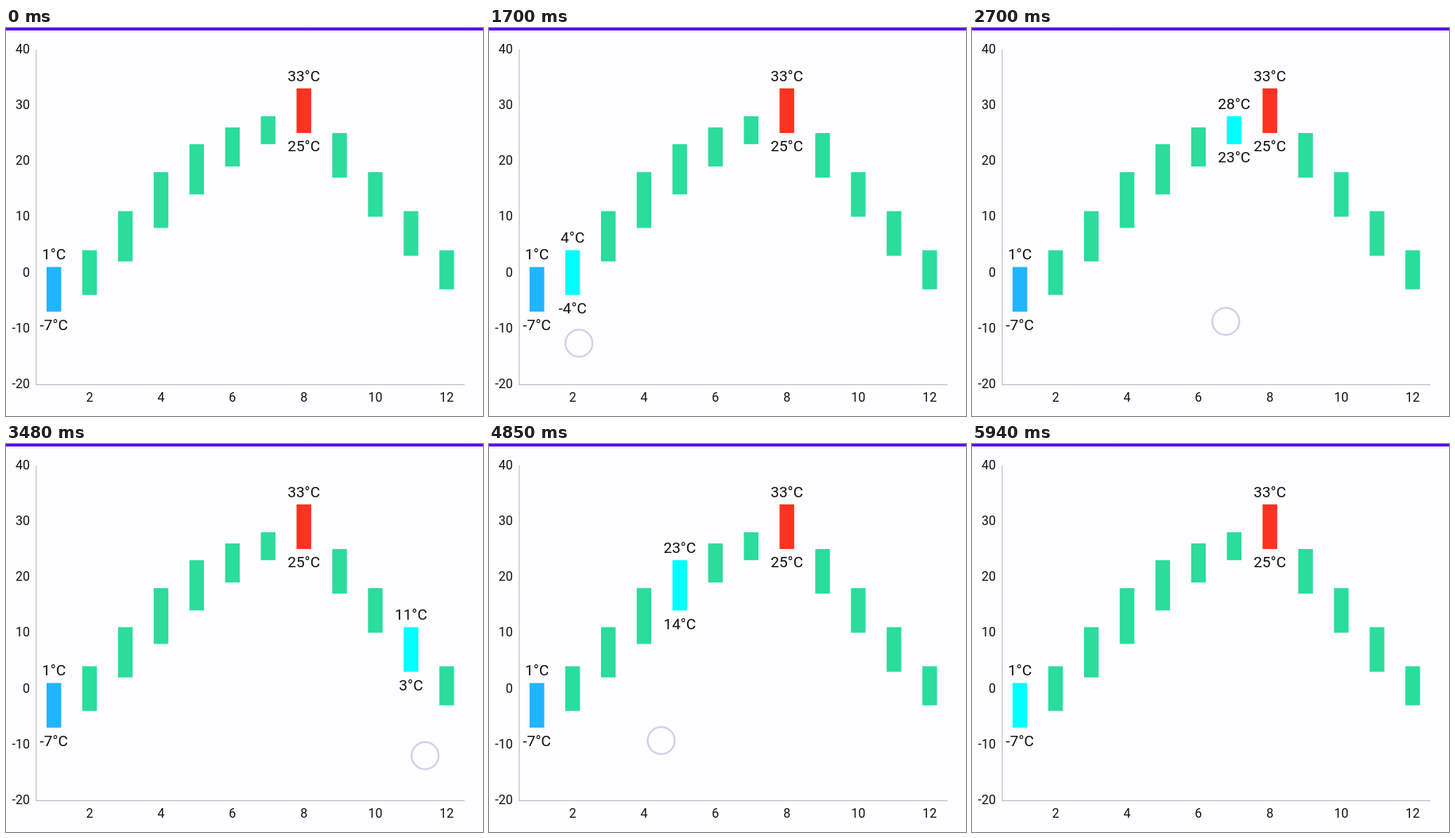
Recreate the animation shown at these times as an HTML page with a canvas. Size 600 by 488 pixels, loop 5970 ms.

```html
<!DOCTYPE html>
<html lang="en">
<head>
<meta charset="utf-8">
<title>Monthly temperature range</title>
<style>
html, body { margin: 0; width: 100%; height: 100%; overflow: hidden; background: #fefdff; }
canvas { display: block; }
</style>
</head>
<body>
<canvas id="chart" width="600" height="488"></canvas>
<script>
const ctx = document.getElementById('chart').getContext('2d');
const LOOP = 5970, TOUCH_START = 1210, TOUCH_END = 5940, LAG = 30;
const LEFT = 37.8, RIGHT = 576.8, TOP = 26.8, BOTTOM = 448;
const SLOT = (RIGHT - LEFT) / 12, BAR = 18.4;
const FONT = 'Roboto, sans-serif';
const C = {
  bg: '#fefdff', header: '#5a00e6', axis: '#bfbfc2', text: '#111',
  bar: '#2bdc9c', cold: '#1fb5ff', hot: '#fc3320', active: '#00ffff'
};

// Monthly highs, and how far each low lies below
const highs = [1, 4, 11, 18, 23, 26, 28, 33, 25, 18, 11, 4];
const spans = [8, 8, 9, 10, 9, 7, 5, 8, 8, 8, 8, 7];
const coldest = highs.indexOf(Math.min(...highs));
const hottest = highs.indexOf(Math.max(...highs));

// Key points of the finger's sweep: [ms, x, y]
const path = [
  [1210, 58, 407], [1700, 113, 396.5], [2700, 319, 369], [3480, 527, 392],
  [3850, 575, 402], [4360, 445, 375.5], [4850, 217, 373], [5420, 35, 433],
  [5900, 25, 419]
];

const rise = (i, k) => (path[i + 1][k] - path[i][k]) / (path[i + 1][0] - path[i][0]);

// Monotone tangent: harmonic mean of the neighbouring slopes
function slope(i, k) {
  if (i === 0 || i === path.length - 1) return 0;
  const a = rise(i - 1, k), b = rise(i, k);
  return a * b > 0 ? 2 * a * b / (a + b) : 0;
}

function along(t, k) {
  const last = path.length - 1;
  if (t >= path[last][0]) return path[last][k];
  let i = 0;
  while (t >= path[i + 1][0]) i++;
  const h = path[i + 1][0] - path[i][0], u = (t - path[i][0]) / h, v = 1 - u;
  return v * v * (1 + 2 * u) * path[i][k] + u * u * (3 - 2 * u) * path[i + 1][k]
    + h * u * v * (v * slope(i, k) - u * slope(i + 1, k));
}

const yOf = deg => BOTTOM - (deg + 20) * (BOTTOM - TOP) / 60;
const xOf = i => LEFT + (i + 0.5) * SLOT;

function label(str, x, y, size, align) {
  ctx.font = size + 'px ' + FONT;
  ctx.textAlign = align;
  ctx.fillStyle = C.text;
  ctx.fillText(str, x, y);
}

function drawFrame() {
  ctx.fillStyle = C.bg;
  ctx.fillRect(0, 0, 600, 488);
  ctx.fillStyle = C.header;
  ctx.fillRect(0, 0, 600, 3);
  const shade = ctx.createLinearGradient(0, 3, 0, 6);
  shade.addColorStop(0, 'rgba(150,140,190,0.35)');
  shade.addColorStop(1, 'rgba(150,140,190,0)');
  ctx.fillStyle = shade;
  ctx.fillRect(0, 3, 600, 3);

  ctx.fillStyle = C.axis;
  ctx.fillRect(LEFT - 0.4, TOP, 1.2, BOTTOM - TOP);
  ctx.fillRect(LEFT - 0.4, BOTTOM, RIGHT - LEFT + 0.4, 1.2);
  for (let d = -20; d <= 40; d += 10) label(d, 30, yOf(d) + 5, 16, 'right');
  for (let m = 2; m <= 12; m += 2) label(m, xOf(m - 1), 469.6, 16, 'center');
}

function drawBars(active) {
  highs.forEach((high, i) => {
    const low = high - spans[i];
    const x = xOf(i), top = yOf(high), bottom = yOf(low);
    const base = i === coldest ? C.cold : i === hottest ? C.hot : C.bar;
    ctx.fillStyle = i === active ? C.active : base;
    ctx.fillRect(x - BAR / 2, top, BAR, bottom - top);
    if (i === active || base !== C.bar) {
      label(high + '°C', x, top - 9.2, 19, 'center');
      label(low + '°C', x, bottom + 23.2, 19, 'center');
    }
  });
}

function ring(x, y, width, color) {
  ctx.beginPath();
  ctx.arc(x, y, 17, 0, Math.PI * 2);
  ctx.lineWidth = width;
  ctx.strokeStyle = color;
  ctx.stroke();
}

function drawTouch(x, y) {
  ring(x, y, 3, 'rgba(210,210,238,0.45)');
  ring(x, y, 1.5, 'rgba(192,193,226,0.75)');
}

function draw(t) {
  let active = -1;
  if (t >= TOUCH_START + LAG) {
    const x = along(t - LAG, 1);
    active = Math.max(0, Math.min(11, Math.floor((x - LEFT) / SLOT)));
  }
  drawFrame();
  drawBars(active);
  if (t >= TOUCH_START && t < TOUCH_END) drawTouch(along(t, 1), along(t, 2));
}

const start = performance.now();
function tick() {
  draw((performance.now() - start) % LOOP);
  requestAnimationFrame(tick);
}
tick();
</script>
</body>
</html>
```
